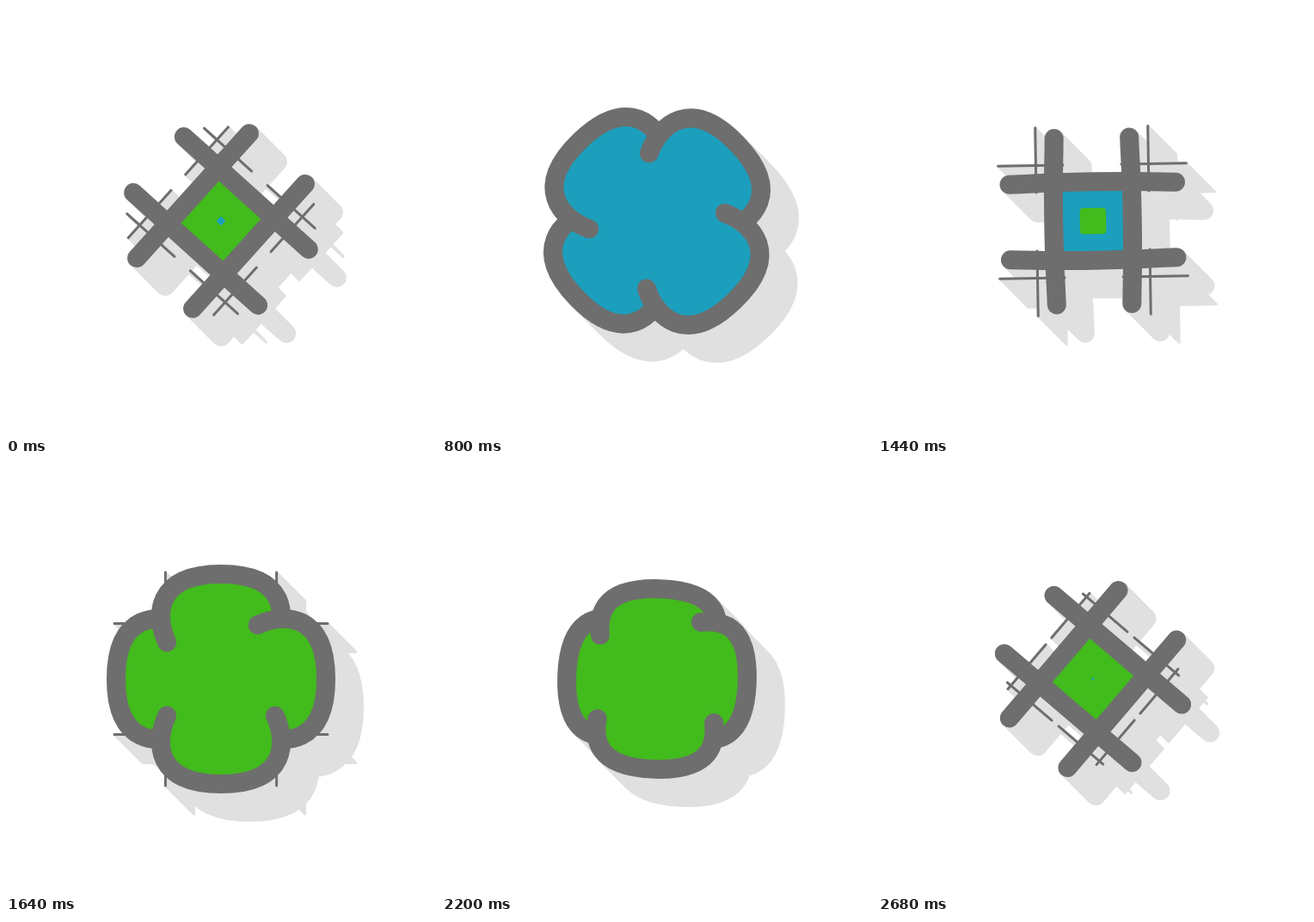
An HTML page with a canvas for the animation above (2720 ms loop, 500 px wide and 500 px high).

```html
<!DOCTYPE html>
<html lang="en">
<head>
<meta charset="utf-8">
<title>Hash and flower</title>
<style>
  html, body { margin: 0; width: 100%; height: 100%; overflow: hidden; background: #fff; }
  canvas { display: block; width: 500px; height: 500px; }
</style>
</head>
<body>
<canvas id="stage" width="500" height="500"></canvas>
<script>
const ctx = document.getElementById('stage').getContext('2d');
const HALF = 1360;
const GRAY = '#6e6e6e', SHADE = '#e0e0e0';
const FILLS = ['#1c9fbd', '#42bb1c'];
const DEPTH = 33;

const span = (t, start, length) => Math.min(1, Math.max(0, (t - start) / length));
const sine = u => (1 - Math.cos(Math.PI * u)) / 2;
const cubic = u => u < 0.5 ? 4 * u ** 3 : 1 - 4 * (1 - u) ** 3;

// Straight at bloom 0, a petal at bloom 1
function barPose(p) {
  const open = cubic(span(p, 0, 515));
  const bloom = open - cubic(span(p, 550, 560));
  const drawnIn = open - sine(span(p, 490, 735));
  const swell = Math.sin(Math.PI * span(p, 550, 810) ** 0.75);
  return {
    bloom,
    dist: 43.8 - 1.8 * bloom + 5.6 * swell,
    half: 97.6 - 55.6 * drawnIn
  };
}

// The bar above the centre, with its fill reaching inwards as it blooms
function bar({ bloom, dist, half }) {
  const tip = dist + 127 * bloom;
  const cx = half * (0.6 + bloom), cy = dist + 48 * bloom;
  const k = 0.65 * half + 58 * bloom;
  const line = new Path2D();
  line.moveTo(-half, -dist);
  line.bezierCurveTo(-cx, -cy, -k, -tip, 0, -tip);
  line.bezierCurveTo(k, -tip, cx, -cy, half, -dist);
  const area = new Path2D(line);
  area.lineTo(0, -dist * (1 - bloom));
  return { line, area };
}

// A line that grows from its middle and then vanishes from there
function ray(t) {
  const grow = sine(span(t, 1016, 547)), fade = sine(span(t, 1249, 547));
  const path = new Path2D();
  if (grow < 0.02 || fade > 0.98) return path;
  const y = -72.3 + 7.7 * grow;
  for (const side of [-124, 124]) {
    path.moveTo(side * fade, y);
    path.lineTo(side * grow, y);
  }
  return path;
}

// Bottom, left, top, right
function turned(path) {
  return [180, 270, 0, 90].map(deg => {
    const copy = new Path2D();
    copy.addPath(path, new DOMMatrix().rotate(deg));
    return copy;
  });
}

function place(offset, angle) {
  ctx.setTransform(1, 0, 0, 1, 250 + offset, 250 + offset);
  ctx.rotate(angle);
}

function strokeAll(paths, width, color) {
  ctx.lineWidth = width;
  ctx.strokeStyle = color;
  for (const path of paths) ctx.stroke(path);
}

function square(half, radius, color) {
  ctx.fillStyle = color;
  ctx.beginPath();
  ctx.roundRect(-half, -half, 2 * half, 2 * half, radius);
  ctx.fill();
}

function draw(now) {
  const t = now % (2 * HALF);
  const turn = Math.floor(t / HALF);
  const p = t - turn * HALF;
  const early = p < HALF / 2;
  const late = early ? p + HALF : p;

  const spin = x => cubic(span(x, 620, 992));
  const angle = Math.PI / 4 * (turn + spin(p) + spin(p + HALF));

  const pose = barPose(p);
  const { line, area } = bar(pose);
  const lines = turned(line), areas = turned(area), rays = turned(ray(late));

  ctx.setTransform(1, 0, 0, 1, 0, 0);
  ctx.fillStyle = '#fff';
  ctx.fillRect(0, 0, 500, 500);
  ctx.lineCap = ctx.lineJoin = 'round';

  for (let d = DEPTH; d >= 0; d--) {
    place(d, angle);
    strokeAll(rays, 3, SHADE);
    strokeAll(lines, 22, SHADE);
  }

  place(0, angle);
  strokeAll(rays, 3, GRAY);

  const color = FILLS[turn], other = FILLS[1 - turn];
  square(pose.dist, 0, early ? other : color);
  const core = 44 * cubic(span(late, 1224, 491));
  square(core, Math.min(4, core * 0.26), early ? color : other);

  ctx.fillStyle = color;
  lines.forEach((path, i) => {
    ctx.fill(areas[i]);
    strokeAll([path], 22, GRAY);
  });
}

function loop(now) {
  draw(now);
  requestAnimationFrame(loop);
}

draw(0);
requestAnimationFrame(loop);
</script>
</body>
</html>
```
